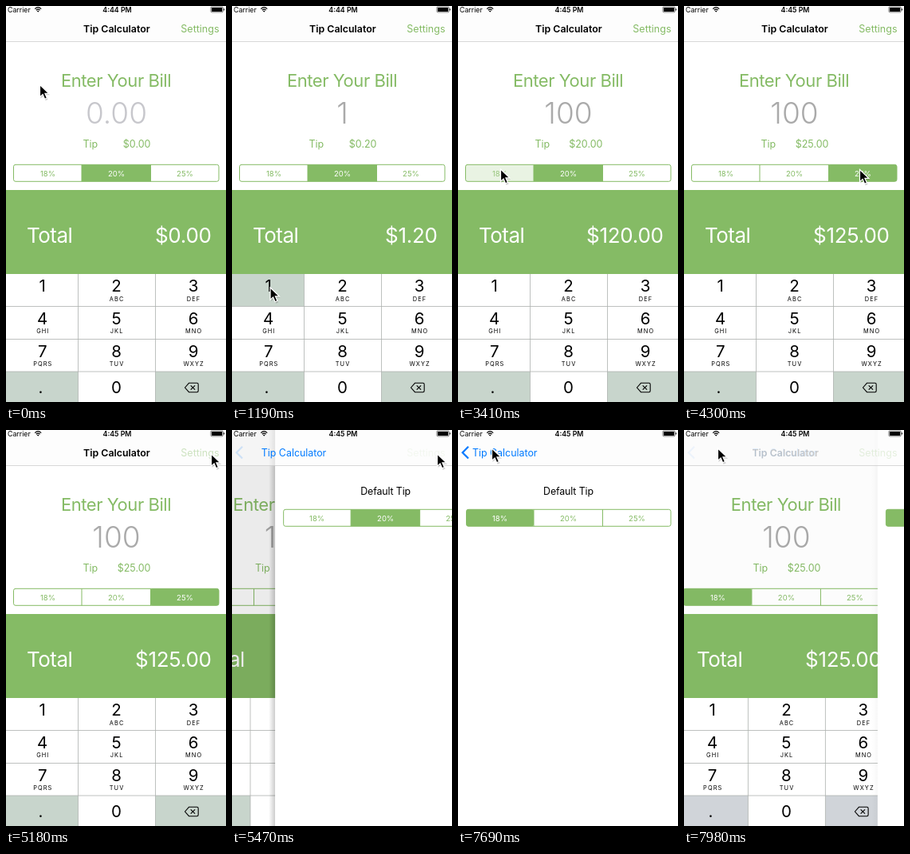
An HTML page that plays this animation: 276 by 495 pixels, repeating every 8000 ms.

```html
<!DOCTYPE html>
<html lang="en">
<head>
<meta charset="utf-8">
<title>Tip Calculator</title>
<style>
  html, body { margin: 0; width: 100%; height: 100%; overflow: hidden; background: #fff; }
  svg { display: block; width: 276px; height: 495px; }
  text { font-family: Inter, "Noto Sans", sans-serif; white-space: pre; }
</style>
</head>
<body>
<svg id="stage" viewBox="0 0 276 495" xmlns="http://www.w3.org/2000/svg">
  <defs>
    <linearGradient id="edge">
      <stop offset="0" stop-color="#000" stop-opacity="0"/>
      <stop offset="1" stop-color="#000" stop-opacity=".25"/>
    </linearGradient>
  </defs>
  <g id="main"></g>
  <rect id="dim" width="276" height="335"/>
  <g id="page"></g>
  <g id="nav"></g>
  <g id="status">
    <path d="M36.2 3.6Q40.2 -.2 44.2 3.6M37.8 5.3Q40.2 3 42.6 5.3" fill="none" stroke="#000" stroke-width="1.2"/>
    <path d="M38.8 6.3Q40.2 5.2 41.6 6.3L40.2 7.8Z"/>
    <rect x="256.9" y=".9" width="15.4" height="7" rx="1.4" fill="none" stroke="#000" stroke-width=".7" opacity=".7"/>
    <rect x="257.9" y="1.9" width="13.4" height="5" rx=".6"/>
    <rect x="273.1" y="3.2" width="1" height="2.4" rx=".5"/>
  </g>
  <g id="cursor">
    <path d="M1 2v15l3.6-3.3 2.5 6 3-1.2-2.5-5.8h5z" fill="#000" opacity=".18"/>
    <path d="M0 0v15.2l3.6-3.3 2.5 5.8 2.8-1.2-2.5-5.6h4.9z" stroke="#fff" stroke-width="1.2"/>
  </g>
</svg>
<script>
const GREEN = '#85bb65', BLUE = '#007aff', KEY = '#c8d5cc', KEY_PLAIN = '#d0d4d9';
const LOOP = 8000, TICK = 147.5, LEAD = 600;
const $ = id => document.getElementById(id);
const clamp = v => Math.max(0, Math.min(1, v));

function add(parent, tag, attrs) {
  const el = document.createElementNS('http://www.w3.org/2000/svg', tag);
  set(el, attrs);
  return parent.appendChild(el);
}
function set(el, attrs) {
  for (const name in attrs) el.setAttribute(name, attrs[name]);
}
function label(parent, str, x, y, size, fill, anchor = 'start', more = {}) {
  const el = add(parent, 'text', { x, y, fill, 'font-size': size, 'text-anchor': anchor, ...more });
  el.textContent = str;
  return el;
}
const box = (parent, x, y, width, height, fill, more = {}) =>
  add(parent, 'rect', { x, y, width, height, fill, ...more });
const line = (parent, d, stroke, width = 1) =>
  add(parent, 'path', { d, stroke, 'stroke-width': width, fill: 'none' });

// Three-way control; returns a function that shows the chosen and pressed parts
function segments(parent, x, y) {
  const cuts = [x, 95, 181.5, 267], h = 21;
  const parts = ['18%', '20%', '25%'].map((str, i) => {
    const [a, b] = [cuts[i], cuts[i + 1]];
    const r = i === 1 ? 0 : 2.5;
    const fill = box(parent, a, y, b - a, h, GREEN, { rx: r });
    const text = label(parent, str, [52.5, 138.5, 224.5][i], y + 14.2, 9.5, GREEN, 'middle');
    return { fill, text };
  });
  box(parent, x, y, 267 - x, h, 'none', { rx: 2.5, stroke: GREEN });
  line(parent, `M95 ${y}v${h}M181.5 ${y}v${h}`, GREEN);
  return (chosen, pressed) => parts.forEach((p, i) => {
    set(p.fill, { opacity: i === chosen ? 1 : i === pressed ? 0.18 : 0 });
    set(p.text, { fill: i === chosen ? '#fff' : GREEN, opacity: i === pressed ? 0.8 : 1 });
  });
}

// Calculator screen
const main = $('main');
const tight = { 'letter-spacing': '-.02em' };
box(main, 0, 0, 276, 495, '#fff');
label(main, 'Enter Your Bill', 138, 101, 22, GREEN, 'middle', tight);
const billText = label(main, '', 138.5, 146.5, 37, '#aaa', 'middle', { 'font-weight': 350 });
label(main, 'Tip', 96.5, 177.3, 12.5, GREEN);
const tipText = label(main, '', 181.5, 177.3, 12.5, GREEN, 'end');
const mainSeg = segments(main, 9.5, 198.3);
box(main, 0, 230, 276, 105, GREEN);
label(main, 'Total', 26, 295.5, 26, '#fff', 'start', tight);
const totalText = label(main, '', 257.7, 295.5, 26, '#fff', 'end', { 'letter-spacing': '-.01em' });

// Keypad
const colX = [0, 90.5, 187.5, 276], rowY = [335, 375.5, 416.5, 457, 495], mid = [45.7, 138.5, 235];
const groups = ['', 'ABC', 'DEF', 'GHI', 'JKL', 'MNO', 'PQRS', 'TUV', 'WXYZ'];
const keys = [];
for (let i = 0; i < 12; i++) {
  const c = i % 3, r = Math.floor(i / 3);
  keys.push(box(main, colX[c], rowY[r], colX[c + 1] - colX[c], rowY[r + 1] - rowY[r], '#fff'));
  if (i < 9) {
    label(main, i + 1, mid[c], rowY[r] + 22.3, 20.5, '#000', 'middle');
    label(main, groups[i], mid[c] + 0.6, rowY[r] + 33.8, 7.4, '#000', 'middle', { 'letter-spacing': 1.1 });
  }
}
label(main, '.', 43.5, 483.5, 20.5, '#000', 'middle');
label(main, '0', 138.5, 484.3, 20.5, '#000', 'middle');
line(main, 'M224.5 477l5-5.7h10q1.7 0 1.7 1.7v8q0 1.7-1.7 1.7h-10zM231.7 474.3l5.4 5.4m0-5.4l-5.4 5.4', '#000', 1.1);
line(main, 'M0 375.5h276M0 416.5h276M0 457h276M90.5 335v160M187.5 335v160', '#aeb2af', 0.8);

// Settings screen
const page = $('page');
const shade = box(page, -8, 0, 8, 495, 'url(#edge)');
box(page, 0, 0, 276, 495, '#fff');
label(page, 'Default Tip', 138.5, 80.5, 12.4, '#000', 'middle', { 'letter-spacing': '-.01em' });
const pageSeg = segments(page, 10.5, 99.3);

// Bars
const nav = $('nav');
box(nav, 0, 0, 276, 44, '#fcfcfc', { opacity: 0.6 });
line(nav, 'M0 44.5h276', '#cfcfcf', 0.8);
const title = label(nav, 'Tip Calculator', 97, 33, 12.4, '#000', 'start', { 'font-weight': 600 });
const back = label(nav, 'Tip Calculator', 18, 33, 12.4, BLUE);
const chevron = line(nav, 'M13 20.8l-7.3 7.4 7.3 7.4', BLUE, 2.2);
const settings = label(nav, 'Settings', 267.5, 33, 12.5, GREEN, 'end');
label($('status'), 'Carrier', 2, 7.8, 8.8, '#000');
const clock = label($('status'), '', 139.5, 7.8, 8.8, '#000', 'middle', { 'font-weight': 600 });

// tick, bill, tip rate, chosen part, pressed part, pressed key
const steps = [
  [-9, 0, 20, 1, -1, -1],
  [3, 0, 20, 1, -1, 0],
  [4, 1, 20, 1, -1, 0],
  [5, 1, 20, 1, -1, -1],
  [10, 10, 20, 1, -1, 10],
  [12, 100, 20, 1, -1, -1],
  [19, 100, 20, 1, 0, -1],
  [20, 100, 18, 0, -1, -1],
  [24, 100, 18, 0, 2, -1],
  [25, 100, 25, 2, -1, -1],
  [48, 100, 25, 0, -1, -1]
];
// tick, x, y of the pointer tip
const path = [
  [-1, 42.5, 98.5], [3, 48, 352], [5, 48, 352], [7, 112, 424], [8, 147, 473], [9, 150.5, 475.5],
  [13, 150.5, 475.5], [18, 53.5, 204], [20, 53.5, 204], [23, 220.5, 204.5], [26, 220.5, 204.5],
  [29, 257.5, 30], [35, 257.5, 30], [39, 45.5, 106], [45, 45.5, 106], [47, 42.5, 23]
];

function pointer(k) {
  const i = path.findIndex(p => p[0] > k);
  if (i === 0) return path[0].slice(1);
  if (i < 0) return path[path.length - 1].slice(1);
  const [a, b] = [path[i - 1], path[i]], f = (k - a[0]) / (b[0] - a[0]);
  return [a[1] + (b[1] - a[1]) * f, a[2] + (b[2] - a[2]) * f];
}

// Critically damped: share of the way still to go, n ticks after the start
function rest(n) {
  const w = 2 * Math.max(0, n);
  return (1 + w) * Math.exp(-w);
}
// 1 = calculator in front, 0 = settings in front
const awayAt = k => k > 48 ? 1 - rest(k - 48.17) : rest(k - 31.49);

function draw(k) {
  const [, bill, rate, chosen, pressed, key] = steps.filter(s => s[0] <= k).pop();
  const tip = bill * rate / 100, money = v => '$' + v.toFixed(2);
  billText.textContent = bill || '0.00';
  set(billText, { fill: bill ? '#aaa' : '#c7c7cc' });
  tipText.textContent = money(tip);
  totalText.textContent = money(bill + tip);
  mainSeg(chosen, pressed);
  pageSeg(k < 43 ? 1 : 0, k === 42 ? 0 : -1);
  keys.forEach((el, i) => {
    const special = i === 9 || i === 11;
    set(el, { fill: special ? (k < 48 ? KEY : KEY_PLAIN) : i === key ? KEY : '#fff' });
  });
  clock.textContent = k < 14 ? '4:44 PM' : '4:45 PM';

  const popping = k > 48, away = awayAt(k);
  set(main, { transform: `translate(${-84 * (1 - away)})` });
  set($('dim'), { opacity: 0.1 * (1 - away) });
  set(shade, { opacity: 1 - away });
  set(page, { transform: `translate(${276 * away})`, visibility: away < 1 ? 'visible' : 'hidden' });

  // The bar labels trail the screens a little
  const x = 18 + 79 * awayAt(k - 0.13);
  const titleOn = popping ? 0.2 * clamp(k - 49) : clamp(2 * away - 1);
  const backOn = popping ? clamp(1 - (k - 48) * 0.45) : 1 - titleOn;
  set(title, { x, opacity: titleOn });
  set(back, { x, opacity: backOn });
  set(chevron, { opacity: popping ? clamp(0.06 + (50 - k) * 0.4) : clamp((k - 32.6) * 0.4) });
  set(settings, { opacity: popping ? 0.2 * clamp(k - 49) : k < 30 ? 1 : 0.4 * away });
  set($('cursor'), { transform: `translate(${pointer(k)})` });
}

const start = performance.now();
let last = null;
function frame() {
  const t = (performance.now() - start) % LOOP;
  const k = Math.floor((t - LEAD) / TICK);
  if (k !== last) draw(last = k);
  requestAnimationFrame(frame);
}
frame();
</script>
</body>
</html>
```
